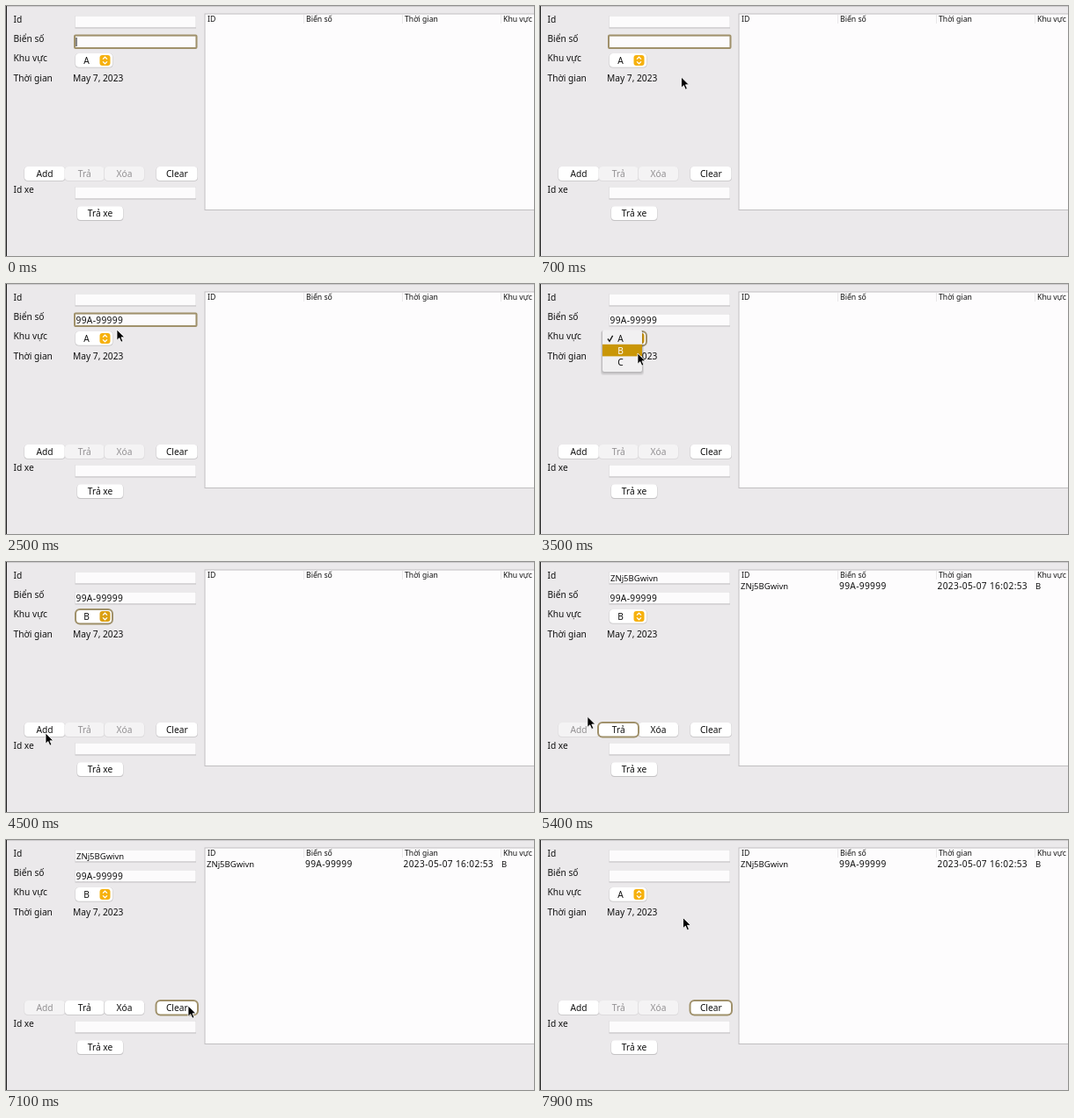
These frames come from a looping animation (600x285 px, 8 s). An HTML page:

```html
<!DOCTYPE html>
<html lang="vi">
<head>
<meta charset="utf-8">
<title>Parking form</title>
<style>
html, body { margin: 0; width: 100%; height: 100%; overflow: hidden; background: #ebe9eb; }
svg { display: block; width: 100vw; height: 100vh; }
text { font: 500 10.2px "Noto Sans", "Open Sans", sans-serif; fill: #111; white-space: pre; }
.head { font-size: 8.7px; }
.num { font-size: 10.2px; font-weight: 400; letter-spacing: .33px; }
.code { font-size: 9.5px; font-weight: 400; }
.mid { text-anchor: middle; }
.off { fill: #929092; }
</style>
</head>
<body>
<svg id="stage" viewBox="0 0 600 285"></svg>
<script>
const LOOP = 8000, STEP = 100;
const PLATE = "99A-99999", CODE = "ZNj5BGwivn";
const stage = document.getElementById("stage");

function el(tag, attrs, parent = stage) {
  const node = document.createElementNS(stage.namespaceURI, tag);
  for (const k in attrs) node.setAttribute(k, attrs[k]);
  return parent.appendChild(node);
}
const group = () => el("g", {});
const rect = (x, y, width, height, fill, rx = 0, parent = stage) =>
  el("rect", { x, y, width, height, fill, rx }, parent);
function label(str, x, y, cls = "", parent = stage) {
  const node = el("text", { x, y, class: cls }, parent);
  node.textContent = str;
  return node;
}
const ring = (x, y, width, height, rx) =>
  el("rect", { x, y, width, height, rx, fill: "none", stroke: "#a0916b", "stroke-width": 2 });
const show = (node, on) => node.setAttribute("visibility", on ? "visible" : "hidden");

function field(y) {
  rect(78.5, y, 137.5, 14, "#dcdadc");
  rect(79, y + .5, 136.5, 13, "#fcfbfc");
  rect(78.5, y + 13.5, 137.5, 1, "#c3c1c3");
}

function button(str, x, y, width) {
  const shade = rect(x - .4, y, width + .8, 16.4, "#c4c2c4", 4);
  const face = rect(x, y - .2, width, 15.8, "#fff", 4);
  const text = label(str, x + width / 2, y + 11.6, "mid");
  return on => {
    shade.setAttribute("fill", on ? "#c4c2c4" : "#d9d7d9");
    face.setAttribute("fill", on ? "#fff" : "#f4f3f4");
    text.setAttribute("class", on ? "mid" : "mid off");
  };
}

// Window and form
rect(0, 0, 600, 285, "#ebe9eb");
rect(0, 0, 600, 1, "#cbc9cb");
rect(0, 0, 1, 285, "#222");
label("Id", 8.5, 18.5);
label("Biển số", 8.5, 40.5);
label("Khu vực", 8.5, 63);
label("Thời gian", 8.5, 86);
label("May 7, 2023", 76, 86);
label("Id xe", 8.5, 213);
[11, 34, 206].forEach(field);
const idText = label(CODE, 80, 22, "code");
const plateText = label("", 79.5, 45, "num");
const caret = rect(79.5, 36, 1, 10, "#111");

// Area selector
rect(78.6, 54, 42.8, 16.6, "#c4c2c4", 4);
rect(79, 54, 42, 15.8, "#fff", 4);
const areaText = label("A", 91.5, 66, "mid");
const knob = rect(106.5, 56, 12, 12, "#f6b10d", 3);
el("path", { d: "M110 60.6l2.5-2.4 2.5 2.4M110 63.4l2.5 2.4 2.5-2.4", fill: "none", stroke: "#fff", "stroke-width": 1.2 });

const setAdd = button("Add", 21, 183.3, 46);
const setReturn = button("Trả", 67, 183.3, 44.5);
const setDelete = button("Xóa", 112, 183.3, 45);
button("Clear", 171, 183.3, 46.5);
button("Trả xe", 81, 228.5, 52);

// Table
rect(225.5, 8.5, 375, 224.5, "#c1bfc1");
rect(226.5, 9.5, 374, 222.5, "#fdfcfd");
["ID", "Biển số", "Thời gian", "Khu vực"].forEach((s, i) => {
  label(s, 229 + i * 112, 18, "head");
  if (i) rect(226 + i * 112, 10, 1, 10, "#e9e7e9");
});
const row = group();
label(CODE, 228, 31.3, "code", row);
label(PLATE, 340, 31.3, "num", row);
label("2023-05-07 16:02:53", 451.5, 31.3, "num", row);
label("B", 563, 31.3, "code", row);

const rings = {
  plate: ring(78, 33.5, 138.5, 14.5, 1),
  area: ring(79, 54, 42, 16.5, 5),
  add: ring(20.5, 183, 46.5, 16.5, 5),
  give: ring(66, 183, 46, 16.5, 5),
  clear: ring(170.5, 183, 47.5, 16.5, 5)
};

// Popup menu
const popup = group();
for (let i = 4; i > 0; i--)
  el("rect", { x: 71 - i / 2, y: 53, width: 45 + i, height: 47 + i, rx: 3, fill: "#000", opacity: .06 }, popup);
rect(71, 52.5, 45, 47.5, "#f1f0f1", 2, popup);
const bar = rect(71, 0, 45, 13.6, "#c99606", 0, popup);
const items = ["A", "B", "C"].map((s, i) => label(s, 91.5, 66 + i * 13.6, "mid", popup));
const tick = el("path", { d: "M77 62.5l2 2.8 3.6-6.4", fill: "none", "stroke-width": 1.3 }, popup);

// Pointer
const arrow = el("path", {
  d: "M0 0V12.2L2.8 9.6 4.8 14.2 6.9 13.3 4.9 8.8H8.8Z",
  fill: "#000", stroke: "#fff", "stroke-width": .8
});
const beam = el("path", {
  d: "M-2.5-5.5Q0-5.5 0-4V4Q0 5.5-2.5 5.5M2.5-5.5Q0-5.5 0-4M0 4Q0 5.5 2.5 5.5M-1.3 1.5H1.3",
  fill: "none", stroke: "#222", "stroke-width": 1.1
});

// Pointer stops: time, x, y
const path = [
  [100, 150, 213], [500, 157, 120], [900, 164, 42], [1000, 174, 36], [1200, 163, 52],
  [2300, 161, 52], [2500, 126, 52], [2800, 111, 62], [3000, 109, 64], [3500, 111, 79],
  [3700, 113, 81], [4100, 94, 134], [4400, 42, 198], [4500, 45, 195], [4700, 46, 190],
  [5300, 46, 189], [5800, 95, 110], [6200, 138, 36], [6300, 140, 38], [6500, 148, 54],
  [6900, 194, 160], [7100, 207, 189], [7200, 196, 188], [7400, 196, 188], [7900, 162.5, 88.5]
];
function pointerAt(t) {
  const i = path.findIndex(p => p[0] > t);
  if (i < 0) return path[path.length - 1].slice(1);
  if (i === 0) return path[0].slice(1);
  const [t0, x0, y0] = path[i - 1], [t1, x1, y1] = path[i];
  const u = (t - t0) / (t1 - t0), k = u * u * (3 - 2 * u) * .4 + u * .6;
  return [x0 + (x1 - x0) * k, y0 + (y1 - y0) * k];
}
const overField = (x, y) =>
  x > 78 && x < 216 && [11, 34, 206].some(top => y >= top && y <= top + 14);

function focusAt(t) {
  if (t < 2900) return "plate";
  if (t < 4900) return "area";
  if (t < 5000) return "add";
  return t < 7100 ? "give" : "clear";
}

function draw(t) {
  const added = t >= 5000, cleared = t >= 7400, editing = added && !cleared;
  const typed = Math.round(Math.min(1, Math.max(0, (t - 1500) / 700)) * PLATE.length);
  const focus = focusAt(t);

  plateText.textContent = cleared ? "" : PLATE.slice(0, typed);
  show(caret, t < 500 || (t >= 1000 && t < 1500) || (t >= 1600 && t < 2400));
  caret.setAttribute("x", 79.5 + (typed ? plateText.getComputedTextLength() : 0));
  show(idText, editing);
  show(row, added);
  setAdd(!editing);
  setReturn(editing);
  setDelete(editing);

  areaText.textContent = t >= 3700 && !cleared ? "B" : "A";
  knob.setAttribute("fill", focus === "area" ? "#dba012" : "#f6b10d");
  for (const k in rings) show(rings[k], k === focus);

  const [x, y] = pointerAt(t);
  const pick = y < 69 ? 0 : 1;
  show(popup, t >= 2900 && t < 3700);
  bar.setAttribute("y", 55 + pick * 13.8);
  items.forEach((n, i) => n.style.fill = i === pick ? "#fff" : "#111");
  tick.setAttribute("stroke", pick ? "#111" : "#fff");

  const visible = t >= 100 && (t < 1500 || t >= 2300), inField = overField(x, y);
  show(arrow, visible && !inField);
  show(beam, visible && inField);
  for (const n of [arrow, beam]) n.setAttribute("transform", `translate(${x} ${y})`);
}

const start = performance.now();
function tickFrame() {
  const t = (performance.now() - start) % LOOP;
  draw(Math.floor(t / STEP) * STEP);
  requestAnimationFrame(tickFrame);
}
tickFrame();
</script>
</body>
</html>
```
